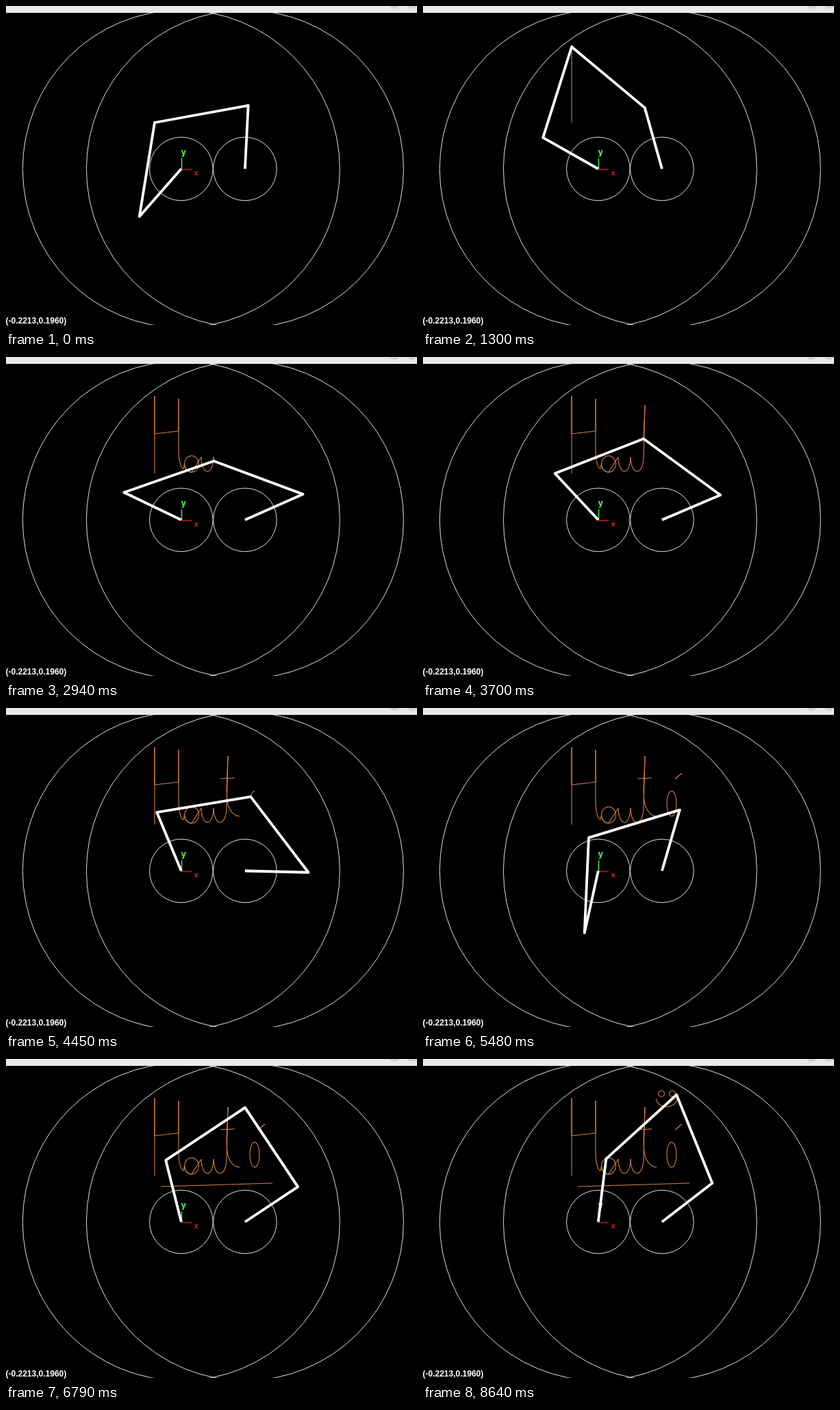
Recreate the animation shown at these times as an HTML page with a canvas. Size 600 px wide and 471 px high, loop 8670 ms.

```html
<!DOCTYPE html>
<html lang="en">
<head>
<meta charset="utf-8">
<title>Five-bar plotter</title>
<style>
html, body { margin: 0; width: 600px; height: 471px; overflow: hidden; background: #000; }
canvas { display: block; }
</style>
</head>
<body>
<canvas id="stage" width="600" height="471"></canvas>
<script>
const ctx = document.getElementById('stage').getContext('2d');
const LOOP = 8670;
const L1 = 92.6, L2 = 138.9;               // inner and outer link lengths
const BASE_L = [255.8, 237.5], BASE_R = [348.9, 237.5];
const LIFTED = 1.4;                        // pen-up speed relative to drawing
const HOME = [217, 170];

const mix = (p, q, f) => [p[0] + (q[0] - p[0]) * f, p[1] + (q[1] - p[1]) * f];

// Points on an ellipse, angles in degrees, clockwise on screen.
function arc(cx, cy, rx, ry, from, to) {
  const n = Math.ceil(Math.abs(to - from) / 18);
  return Array.from({ length: n + 1 }, (_, i) => {
    const a = (from + (to - from) * i / n) * Math.PI / 180;
    return [cx + rx * Math.cos(a), cy + ry * Math.sin(a)];
  });
}

// Strokes are spread evenly over a time span; the pen lifts between them.
const segments = [];
let tip = HOME, clock = 890;
function write(end, ...strokes) {
  const run = [];
  for (const stroke of strokes) {
    stroke.forEach((q, i) => {
      const length = Math.hypot(q[0] - tip[0], q[1] - tip[1]);
      run.push({ p: tip, q, down: i > 0, cost: i > 0 ? length : length / LIFTED });
      tip = q;
    });
  }
  const pace = (end - clock) / run.reduce((sum, s) => sum + s.cost, 0);
  for (const s of run) {
    s.start = clock;
    clock += s.cost * pace;
    s.end = clock;
  }
  segments.push(...run);
}

const stemTop = [324, 70], stemMid = [322, 119];
const capital = [HOME, [217, 57], [217, 112], [252, 108], [252, 61], ...arc(259, 135, 7, 28, 180, 90)];
const round = arc(271, 156, 10.5, 12, 180, -270);
const bowls = [...arc(294, 146, 9, 21, 180, 0), ...arc(312.5, 146, 9.5, 21, 180, 0)];
const hook = arc(341, 130, 18.5, 28, 180, 90);
const eye = x => arc(x, 50.5, 4.5, 4.3, 90, -270);

write(2150, capital);
write(3700, [tip, ...round, ...bowls, stemTop, stemMid]);
write(4400, [tip, ...hook], [[313, 103], [334, 102]], [[363, 121]]);
write(5480, arc(363, 139.5, 7, 18.5, -90, -450), [[378, 95], [368, 103.5]], [[242.2, 189.2]]);
write(6790, [[226, 186], [389, 181]], [[349, 71]]);
write(7980, eye(348), eye(364), arc(355.6, 56.7, 15.5, 13, 175, -20));

function line(p, q, color, width) {
  ctx.strokeStyle = color;
  ctx.lineWidth = width;
  ctx.beginPath();
  ctx.moveTo(...p);
  ctx.lineTo(...q);
  ctx.stroke();
}

function circle([x, y], r) {
  ctx.beginPath();
  ctx.arc(x, y, r, 0, 2 * Math.PI);
}

function label(text, x, y, size, family, color) {
  ctx.font = `bold ${size}px ${family}, sans-serif`;
  ctx.fillStyle = color;
  ctx.fillText(text, x, y);
}

// Middle joint of one arm; side picks the bend direction.
function elbow(base, pen, side) {
  const dx = pen[0] - base[0], dy = pen[1] - base[1], d = Math.hypot(dx, dy);
  const a = (d * d + L1 * L1 - L2 * L2) / (2 * d);
  const h = side * Math.sqrt(Math.max(0, L1 * L1 - a * a));
  return [base[0] + (a * dx - h * dy) / d, base[1] + (a * dy + h * dx) / d];
}

function drawWorkspace() {
  ctx.strokeStyle = '#e0e0e0';
  ctx.lineWidth = 1;
  for (const base of [BASE_L, BASE_R]) {
    for (const r of [L2 - L1, L1 + L2]) {
      circle(base, r);
      ctx.stroke();
    }
  }
  line([256.5, 238], [256.5, 222], '#3fe83f', 1.6);
  line([256, 238.5], [271, 238.5], '#c81414', 1.6);
  label('y', 255.5, 217, 11.5, '"DejaVu Sans"', '#4cf04c');
  label('x', 274.5, 247, 10, '"DejaVu Sans"', '#d01818');
}

// Draws the ink laid down so far and returns the pen position.
function drawTrace(t) {
  let pen = HOME;
  for (const s of segments) {
    if (t <= s.start) break;
    pen = t >= s.end ? s.q : mix(s.p, s.q, (t - s.start) / (s.end - s.start));
    if (s.down) line(s.p, pen, '#d5804a', 1.1);
  }
  return pen;
}

function drawArms(pen) {
  const left = elbow(BASE_L, pen, -1), right = elbow(BASE_R, pen, 1);
  const chain = [BASE_L, left, pen, right, BASE_R];
  for (let i = 1; i < chain.length; i++) line(chain[i - 1], chain[i], '#fff', 3.8);
  ctx.fillStyle = '#fff';
  for (const joint of [left, pen, right]) {
    circle(joint, 1.9);
    ctx.fill();
  }
}

function drawTitleBar() {
  ctx.fillStyle = '#e9e9e9';
  ctx.fillRect(0, 0, 600, 10);
  ctx.fillStyle = '#d2d2d2';
  for (const x of [567, 593]) {
    circle([x, -4], 8);
    ctx.fill();
  }
}

function render(t) {
  ctx.fillStyle = '#000';
  ctx.fillRect(0, 0, 600, 471);

  ctx.save();
  ctx.beginPath();
  ctx.rect(0, 10, 600, 455);
  ctx.clip();
  drawWorkspace();
  drawArms(drawTrace(t));
  ctx.restore();

  label('(-0.2213,0.1960)', -0.5, 462.5, 12, '"Liberation Sans", Arial', '#fff');
  drawTitleBar();
}

const begin = performance.now();
function frame() {
  render((performance.now() - begin) % LOOP);
  requestAnimationFrame(frame);
}
frame();
</script>
</body>
</html>
```
